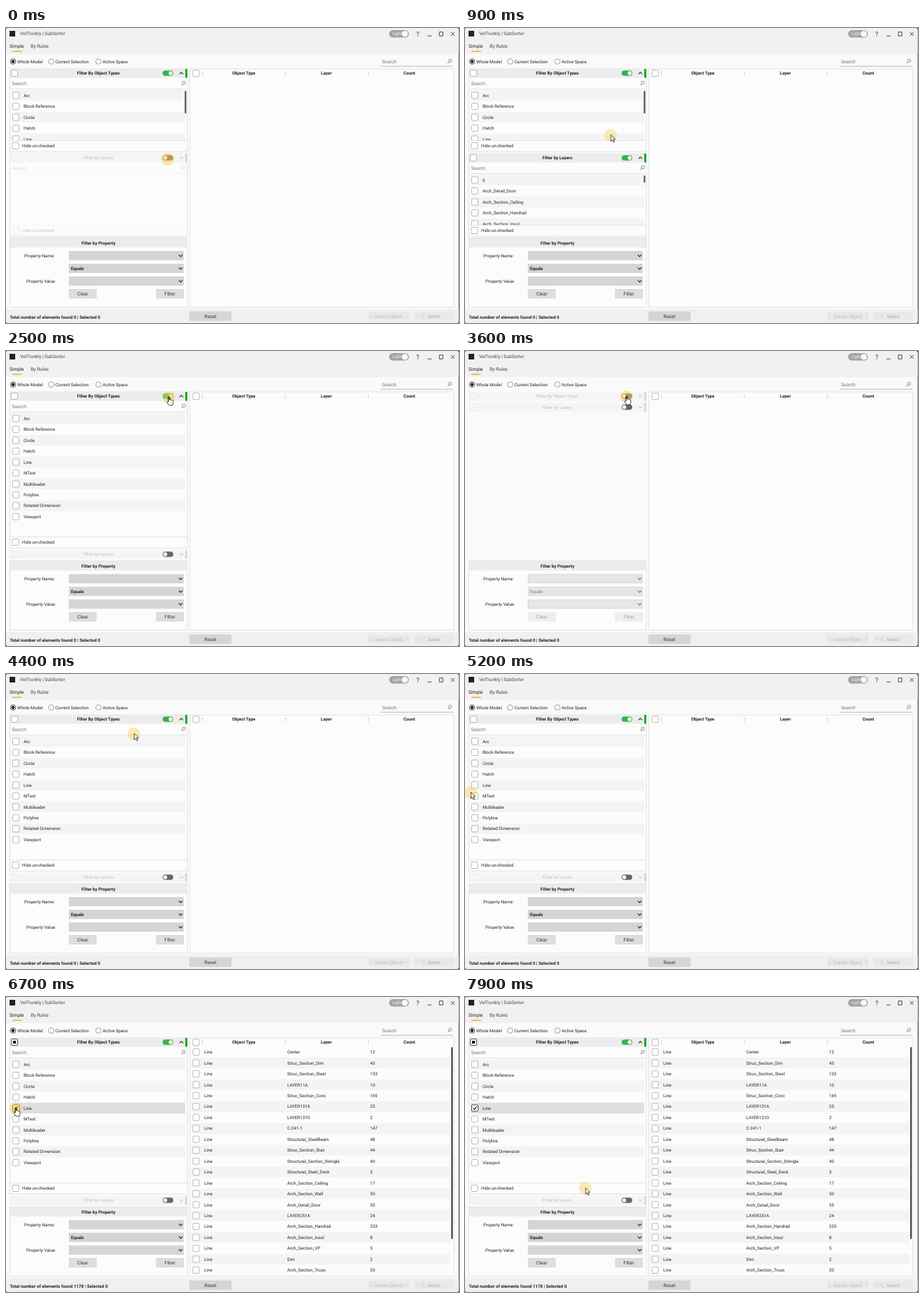
An HTML page for the animation above (8000 ms loop, 642 px wide and 418 px high).

```html
<!DOCTYPE html>
<html lang="en">
<head>
<meta charset="utf-8">
<title>Filter panel</title>
<style>
html, body { margin: 0; width: 100%; height: 100%; overflow: hidden; background: #333; }
svg { display: block; }
text { font-family: Roboto, Arial, sans-serif; text-rendering: geometricPrecision; white-space: pre; }
</style>
</head>
<body>
<svg id="stage" width="642" height="418" viewBox="0 0 642 418"></svg>
<script>
const LOOP = 8000;
const stage = document.getElementById('stage');
const types = ['Arc', 'Block Reference', 'Circle', 'Hatch', 'Line', 'MText', 'Multileader',
  'Polyline', 'Rotated Dimension', 'Viewport'];
const layers = ['0', 'Arch_Detail_Door', 'Arch_Section_Ceiling', 'Arch_Section_Handrail', 'Arch_Section_Insul'];
const found = `Center 12,Struc_Section_Dim 45,Struc_Section_Steel 133,LAYER11A 10,Struc_Section_Conc 169,
LAYER131A 25,LAYER131D 2,C-241-1 147,Structural_SteelBeam 48,Struc_Section_Stair 44,
Structural_Section_StAngle 40,Structural_Steel_Deck 3,Arch_Section_Ceiling 17,Arch_Section_Wall 50,
Arch_Detail_Door 55,LAYER251A 24,Arch_Section_Handrail 253,Arch_Section_Insul 8,Arch_Section_VP 5,
Dim 2,Arch_Section_Truss 20`.split(',').map(s => s.trim().split(' '));

// Drawing helpers; text is placed by its vertical centre.
const rect = (x, y, w, h, fill, extra = '') =>
  `<rect x="${x}" y="${y}" width="${w}" height="${h}" fill="${fill}" ${extra}/>`;
const line = (d, color, w = 1, extra = '') =>
  `<path d="${d}" fill="none" stroke="${color}" stroke-width="${w}" ${extra}/>`;
const circle = (x, y, r, fill, extra = '') =>
  `<circle cx="${x}" cy="${y}" r="${r}" fill="${fill}" ${extra}/>`;
const text = (x, y, s, { size = 6.2, color = '#222', bold = false, mid = false } = {}) =>
  `<text x="${x}" y="${y + size * .36}" font-size="${size}" fill="${color}"` +
  `${bold ? ' font-weight="700"' : ''}${mid ? ' text-anchor="middle"' : ''}>${s}</text>`;
const group = (s, opacity) => `<g opacity="${opacity}">${s}</g>`;
const head = (x, y, s, color) => text(x, y, s, { bold: true, mid: true, color });

function check(x, y, state = '') {
  const mark = state === 'on' ? line(`M${x - 2.4} ${y}l1.8 2 3.2-4.2`, '#111', 1.2)
    : state === 'part' ? rect(x - 2, y - 2, 4, 4, '#111') : '';
  return rect(x - 4.5, y - 4.5, 9, 9, '#fff', `rx="1" stroke="${state ? '#222' : '#aaa'}" stroke-width=".8"`) + mark;
}

const lens = (x, y) => circle(x + 1, y - 1, 2.2, 'none', 'stroke="#666" stroke-width=".7"') +
  line(`M${x - .6} ${y + .6}l-2.2 2.2`, '#666', .8);

const chevron = (x, y, dir, color, w = 1.1) =>
  line(`M${x - 2.6} ${y - dir * 1.3}l2.6 ${dir * 2.6} 2.6 ${-dir * 2.6}`, color, w);

const toggle = (x, y, on) => rect(x - 7.5, y - 3.8, 15, 7.6, on ? '#35b44a' : '#666', 'rx="3.8"') +
  circle(x + (on ? 3.8 : -3.8), y, 2.7, '#fff');

const button = (x, y, w, label, fill) =>
  rect(x, y, w, 12.5, fill, 'stroke="#ccc" stroke-width=".6"') +
  text(x + w / 2, y + 6.4, label, { size: 6.7, mid: true, color: '#333' });

function panel({ y, bottom, title, items, on, open, bar = 0, picked = -1, state }) {
  const c = y + 6;
  let s = open ? rect(5.5, y, 251.5, bottom - y, '#fcfcfc', 'stroke="#ddd" stroke-width=".8"') : '';
  s += rect(5.5, y, 251.5, 12.5, on ? '#ececec' : '#f5f5f5') +
    group(check(12, c, state), on ? 1 : .15) +
    head(131, c, title, on ? '#222' : '#cfcfcf') + toggle(229.5, c, on) +
    chevron(248.5, c, open ? -1 : 1, on ? '#222' : '#ccc') +
    rect(254, y, 3, 12.5, on ? '#10b020' : '#d8d8d8');
  if (!open) return s;

  let rows = '';
  if (on) items.forEach((name, i) => {
    const ry = 8 + i * 15.47;
    const fill = i === picked ? '#dfdfdf' : i % 2 ? '#fcfcfc' : '#f4f4f4';
    rows += rect(1, ry - 7.7, 246, 15.4, fill) +
      check(7, ry, i === picked ? 'on' : '') + text(18, ry, name);
  });
  const body = text(8.5, y + 20.5, 'Search', { size: 6.7, color: '#777' }) + lens(251, y + 20.5) +
    line(`M6 ${y + 28.5}H257M6 ${bottom - 15.5}H257`, '#ddd', .8) +
    `<svg x="7" y="${y + 29.5}" width="250" height="${bottom - y - 45.5}">${rows}</svg>` +
    (on && bar ? rect(253.3, y + 31, 2.2, bar, '#555', 'rx="1"') : '') +
    check(13.5, bottom - 8) + text(23, bottom - 8, 'Hide un-checked');
  return s + group(body, on ? 1 : .25);
}

function properties(on) {
  let s = rect(5.5, 297.5, 251.5, 98, '#fcfcfc', 'stroke="#ddd" stroke-width=".8"') +
    rect(6, 298, 250.5, 13, '#ececec') + head(131, 304.5, 'Filter by Property') +
    text(26, 322.5, 'Property Name:') + text(29, 358.5, 'Property Value:');
  for (const y of [316.5, 334.5, 352.5])
    s += rect(89.5, y, 162, 12.3, on ? '#d4d6d5' : '#e6e6e6', 'stroke="#ccc" stroke-width=".6"') +
      chevron(247.5, y + 6.2, 1, on ? '#222' : '#777');
  s += text(92, 340.7, 'Equals', { bold: on, color: on ? '#222' : '#777' });
  return s + group(button(89.5, 370.3, 38.5, 'Clear', '#dedede') +
    button(213, 370.3, 38.5, 'Filter', '#dedede'), on ? 1 : .45);
}

function table(full) {
  let s = rect(260.5, 58, 374.5, 337.5, '#fcfcfc', 'stroke="#ddd" stroke-width=".8"') + check(269.5, 64.3) +
    line('M278.5 61V68M396 61V68M513.5 61V68', '#ccc', .8) +
    head(337, 64, 'Object Type') + head(454, 64, 'Layer') + head(571.5, 64, 'Count');
  if (!full) return s;
  found.forEach(([layer, count], i) => {
    const y = 78 + i * 15.45;
    s += rect(262, y - 7.7, 368, 15.4, i % 2 ? '#f4f4f4' : '#fcfcfc') + check(269.5, y) +
      text(281, y, 'Line') + text(398.5, y, layer) + text(516, y, count);
  });
  return s + rect(631, 71, 2.2, 272, '#444', 'rx="1"');
}

function frame(total) {
  const radio = (x, label, on) => circle(x, 47.5, 3.8, '#fff', `stroke="${on ? '#222' : '#888'}" stroke-width=".8"`) +
    (on ? circle(x, 47.5, 2.2, '#111') : '') + text(x + 6, 47.5, label);
  return rect(0, 0, 641.5, 418, '#fafafa', 'rx="3"') + rect(0, 0, 641.5, 37, '#f1f1f1', 'rx="3"') +
    rect(0, 398, 641.5, 20, '#f0f0f0', 'rx="3"') +
    rect(5, 4, 8, 8, '#222') + text(20, 8, 'VelTrunkly | SubSorter', { size: 6.5, color: '#444' }) +
    rect(543, 3, 28, 10.5, '#a3a3a3', 'rx="5.2"') + text(547.5, 8.2, 'Light', { color: '#f4f4f4' }) +
    circle(565.3, 8.2, 4.3, '#f8f8f8') + text(583.5, 8.2, '?', { size: 9.5, mid: true, color: '#444' }) +
    line('M597.5 11.2h5.5M614.2 5.7h5v5.5h-5zM630.5 5.8l5.2 5.2m0-5.2l-5.2 5.2', '#333', .9) +
    text(5, 25.5, 'Simple', { size: 6.7 }) + text(35, 25.5, 'By Rules', { size: 6.7, color: '#444' }) +
    rect(9, 32.4, 13.5, 1.4, '#efac25') +
    radio(10, 'Whole Model', true) + radio(64, 'Current Selection') + radio(131, 'Active Space') +
    text(533, 47.5, 'Search', { size: 6.7, color: '#777' }) + lens(628.5, 47.3) +
    line('M531 54.2H634', '#aaa', .8) +
    text(5.5, 409.3, `Total number of elements found ${total} | Selected 0`, { bold: true }) +
    button(260.5, 402, 58.5, 'Reset', '#d5d5d5') +
    rect(513, 402, 59, 12.5, '#e9e9e9') + rect(578.5, 402, 56.5, 12.5, '#e9e9e9') +
    text(522, 408.4, 'Isolate Object', { size: 6.7, color: '#bbb' }) +
    text(597.5, 408.4, 'Select', { size: 6.7, color: '#aaa' }) +
    line('M516 406v4h3M567 407l2 2 2-2M583 406l2 2-2 2M594 406h-4v3l2 2h3', '#ccc', .8);
}

// Pointer path: time, x, y
const path = [
  [0, 229, 186], [800, 229, 186], [1100, 161, 84], [1300, 218, 67], [1400, 228, 74], [1500, 226, 92],
  [1700, 229, 185], [1900, 229, 185], [2500, 231, 66], [3400, 231, 66], [3500, 229, 65], [4200, 229, 65],
  [5100, 14, 154], [5200, 8, 168], [5300, 8, 168], [5600, 102, 330], [5900, 14, 148], [6000, 14, 158],
  [7200, 14, 158], [7800, 171, 277], [7900, 170.5, 271], [8000, 170.5, 271]];
const handTimes = [[300, 900], [1700, 2000], [2400, 4300], [6000, 7300]];

function pointer(t) {
  const i = path.findIndex(p => p[0] > t);
  const [t0, x0, y0] = path[i - 1], [t1, x1, y1] = path[i];
  const k = (t - t0) / (t1 - t0);
  const x = x0 + (x1 - x0) * k, y = y0 + (y1 - y0) * k;
  const hand = handTimes.some(([a, b]) => t >= a && t < b);
  const shape = hand
    ? 'M-.9 6V-.8Q0-2.2 .9-.8V3.2Q2-.0 0 0M.9 3Q2 2.2 2.6 3.4 3.7 2.6 4.3 3.9 5.8 3.4 5.9 5V8L4.8 11H.2L-2.8 6.8Q-2.6 5.2-.9 6.2V-.8Q0-2.2 .9-.8Z'
    : 'M.5-.5V8.3L2.5 6.4 4 9.8 5.5 9.1 4 5.8H6.7Z';
  return circle(x, y, 9, '#fad04a', `opacity="${hand || t < 300 ? .5 : .4}"`) +
    (t < 300 ? '' : `<path d="${shape}" transform="translate(${x} ${y})" fill="#fff" stroke="#222" stroke-width=".8" stroke-linejoin="round"/>`);
}

function draw(now) {
  const t = Math.floor(now % LOOP / 100) * 100;
  const split = t < 1800;
  const typesOn = t < 2800 || t >= 3700;
  const full = t >= 6700;
  stage.innerHTML = frame(full ? 1178 : 0) + table(full) +
    panel({ y: 58, bottom: split ? 175 : 279, title: 'Filter By Object Types', items: types, on: typesOn,
      open: typesOn, bar: split ? 32 : 0, picked: t >= 6300 ? 4 : -1, state: full ? 'part' : '' }) +
    panel({ y: split ? 178 : typesOn ? 282 : 73.5, bottom: 295, title: 'Filter by Layers', items: layers,
      on: t >= 600 && split, open: split, bar: 10 }) +
    properties(typesOn) + pointer(t);
}

let last = -1;
function tick() {
  const now = performance.now(), step = Math.floor(now / 100);
  if (step !== last) draw(now);
  last = step;
  requestAnimationFrame(tick);
}
tick();
</script>
</body>
</html>
```
